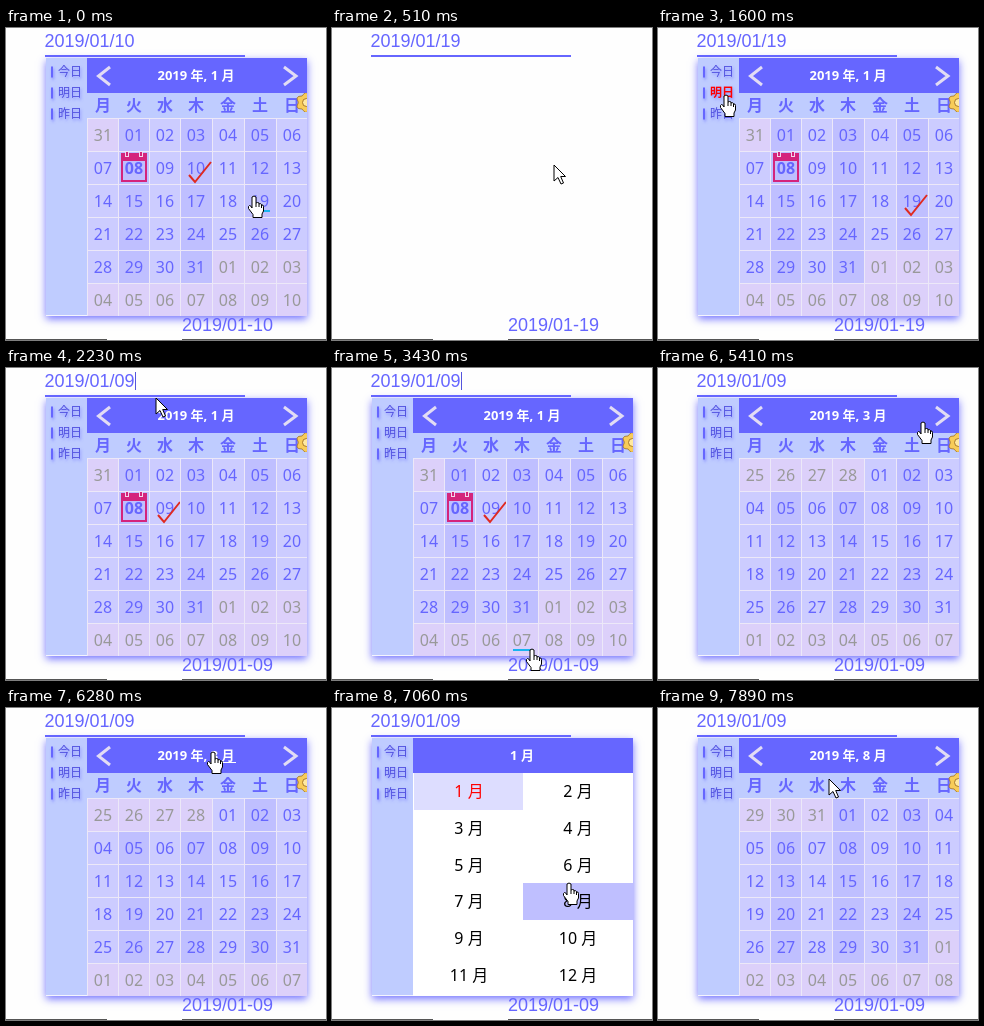
These frames come from a looping animation (320x312 px, 8 s). An HTML page with a canvas:

```html
<!DOCTYPE html>
<html lang="ja">
<head>
<meta charset="utf-8">
<title>Date picker</title>
<style>
  html, body { margin: 0; width: 100%; height: 100%; overflow: hidden; background: #fefefe; }
  canvas { display: block; }
</style>
</head>
<body>
<canvas id="stage" width="320" height="312"></canvas>
<script>
const g = document.getElementById('stage').getContext('2d');
const LOOP = 8000;
const BLUE = '#6666ff';
const SANS = '"Noto Sans", "Noto Sans CJK JP", sans-serif';
const ARIAL = '"Liberation Sans", Arial, sans-serif';

// Screen updates: first time, last time, count
const BURSTS = [
  [0, 0, 1], [120, 1080, 8], [1330, 2350, 9], [2470, 3430, 8], [3580, 4600, 9],
  [4720, 5710, 8], [5860, 6790, 8], [6940, 7060, 2], [7330, 7330, 1], [7610, 7890, 3]
];
const TICKS = BURSTS.flatMap(([a, b, n]) =>
  Array.from({ length: n }, (_, i) => a + (n > 1 ? (b - a) * i / (n - 1) : 0)));

// Pointer path: time, x, y
const PATH = [
  [0, 248, 168], [230, 248, 168], [800, 120, 14], [1000, 120, 14],
  [1570, 68, 67], [1720, 68, 67], [2090, 128, 16], [2210, 150, 30],
  [2340, 150, 30], [2720, 116, 134], [3000, 155, 140], [3200, 218, 206],
  [3430, 200, 281], [3650, 200, 281], [4440, 265, 54], [5420, 265, 54],
  [6240, 207, 44], [6390, 207, 44], [6790, 200, 184], [6940, 222, 180],
  [7050, 237, 175], [7470, 237, 175], [7890, 171, 71], [8000, 171, 71]
];
const FOCUS = [[930, 1720], [2090, 4780]];

const HAND = new Path2D('M-2 1Q0-1 2 1V7Q3.5 6 5 7V8Q6.5 7 7.5 8.5V9Q9.5 8.5 9.5 10.5V15L8 18V21.5H-1V18.5L-5.5 12.5Q-6 10-4.5 9.5Q-3 9.5-2 12Z');
const KNUCKLES = new Path2D('M2 7V11M5 8V11M7.5 9V12');
const ARROW = new Path2D('M0 0V16L4 12.5L7 19L9.5 18L6.7 11.5H11.5Z');
const BEAM = new Path2D('M-3-8H-1L0-7L1-8H3M0-7V7M-3 8H-1L0 7L1 8H3');

// The last four columns are one pixel wider
const colX = c => 81 + c * 31 + Math.max(0, c - 3);
const rowY = r => 90 + r * 33;
const monthY = r => 65 + r * 36.75;
const inside = (p, x, y, w, h) => p.x >= x && p.x < x + w && p.y >= y && p.y < y + h;
const pad = n => String(n).padStart(2, '0');

function rect(x, y, w, h, color) {
  g.fillStyle = color;
  g.fillRect(x, y, w, h);
}

function text(s, x, y, font, color, align = 'center') {
  g.font = font;
  g.fillStyle = color;
  g.textAlign = align;
  g.fillText(s, x, y);
}

function line(points, color, width) {
  g.beginPath();
  points.forEach(([x, y]) => g.lineTo(x, y));
  g.strokeStyle = color;
  g.lineWidth = width;
  g.stroke();
}

function pointerAt(t) {
  const i = Math.max(1, PATH.findIndex(k => k[0] > t));
  const [a, b] = [PATH[i - 1], PATH[i]];
  const u = (t - a[0]) / (b[0] - a[0]);
  const e = u * u * (3 - 2 * u);
  return { x: Math.round(a[1] + (b[1] - a[1]) * e), y: Math.round(a[2] + (b[2] - a[2]) * e) };
}

function stateAt(t) {
  const focus = FOCUS.find(([a, b]) => t >= a && t < b);
  return {
    p: pointerAt(t),
    day: t < 230 ? 10 : t < 1720 ? 19 : 9,
    open: t < 230 || (t >= 930 && t < 1720) || t >= 2090,
    month: t < 4700 ? 0 : t < 5200 ? 1 : t < 6390 ? 2 : 7,
    list: t >= 6390 && t < 7330,
    caret: focus && (t - focus[0]) % 1060 < 530
  };
}

function drawPage(s) {
  rect(0, 0, 320, 312, '#fefefe');
  text('2019/01/' + pad(s.day), 38.5, 19, '18px ' + ARIAL, BLUE, 'left');
  rect(39, 27, 200, 2, BLUE);
  if (s.caret) rect(129, 4, 1, 18, '#5555dd');
  text('2019/01-' + pad(s.day), 176, 303, '18px ' + ARIAL, BLUE, 'left');
  rect(0, 311, 101, 1, '#555');
  rect(176, 311, 144, 1, '#555');
}

// Returns true when the pointer is over a link
function drawSide(p) {
  let hit = false;
  rect(40, 30, 41, 257, '#bfccff');
  ['今日', '明日', '昨日'].forEach((label, i) => {
    const y = 43.5 + i * 21;
    const over = inside(p, 44, y - 8, 34, 16);
    hit = hit || over;
    g.save();
    g.shadowColor = 'rgba(102,102,255,.6)';
    g.shadowOffsetX = 1;
    g.shadowOffsetY = 2;
    g.shadowBlur = 3;
    rect(45, y - 5, 2, 11, BLUE);
    text(label, 52, y + 4.5, (over ? 'bold ' : '500 ') + '12px ' + SANS, over ? '#f00' : '#5050e0', 'left');
    g.restore();
  });
  return hit;
}

function drawHoliday() {
  g.save();
  g.beginPath();
  g.rect(288, 65, 13, 19);
  g.clip();
  g.fillStyle = '#f8cc58';
  g.strokeStyle = '#a87828';
  g.lineWidth = 1;
  g.beginPath();
  for (let i = 0; i <= 60; i++) {
    const a = i * Math.PI / 30, r = 8.8 - 1.1 * Math.cos(6 * a);
    g.lineTo(300 + r * Math.cos(a), 74.5 + r * Math.sin(a));
  }
  g.fill();
  g.stroke();
  g.beginPath();
  g.arc(300.5, 74.5, 4, 0, 7);
  g.fillStyle = '#ffe9a0';
  g.fill();
  g.stroke();
  g.restore();
}

function drawToday(x, y) {
  const pink = '#d4247c';
  g.strokeStyle = pink;
  g.lineWidth = 2;
  g.strokeRect(x + 3, y + 3, 24, 27);
  rect(x + 2, y + 2, 26, 8, pink);
  [6, 20].forEach(dx => {
    rect(x + dx, y + 1, 4, 5, '#f4d4ec');
    rect(x + dx + 1, y + 1, 2, 4, pink);
  });
}

function drawCalendar(s) {
  const { p, month } = s;
  let hit = inside(p, 264, 30, 37, 35) || inside(p, 82, 30, 30, 35);
  const onTitle = inside(p, 205, 40, 27, 16);
  text(`2019 年, ${month + 1} 月`, 190, 52, 'bold 13px ' + SANS, '#fff');
  if (onTitle) rect(204, 54, 26, 1, '#fff');
  line([[104, 39], [92.5, 48], [104, 57]], '#e2dcf4', 3);
  line([[278, 39], [290, 48], [278, 57]], '#e2dcf4', 3);

  rect(81, 65, 220, 25, '#bfccff');
  [...'月火水木金土日'].forEach((d, c) =>
    text(d, colX(c) + 16, 83, 'bold 16px ' + SANS, BLUE));
  drawHoliday();

  const lead = (new Date(Date.UTC(2019, month, 1)).getUTCDay() + 6) % 7;
  for (let i = 0; i < 42; i++) {
    const c = i % 7, x = colX(c), y = rowY(Math.floor(i / 7));
    const w = Math.min(301, colX(c + 1)) - x;
    const date = new Date(Date.UTC(2019, month, 1 - lead + i));
    const own = date.getUTCMonth() === month, day = date.getUTCDate();
    const today = own && month === 0 && day === 8;
    rect(x, y, w, 33, '#ece8f8');
    rect(x + 1, y + 1, w - 1, 32, !own ? '#dcd0fa' : c % 2 ? '#bfbfff' : '#ccccff');
    if (today) drawToday(x + 1, y);
    text(pad(day), x + 16, y + 23, (today ? 'bold ' : '') + '16px ' + SANS, own ? BLUE : '#999');
    if (inside(p, x + 5, y + 6, 22, 22)) {
      hit = true;
      rect(x + 7, y + 26, 19, 2, '#18b4f0');
    }
    if (own && month === 0 && day === s.day)
      line([[x + 9, y + 24], [x + 15, y + 31], [x + 31, y + 11]], '#e02a20', 2);
  }
  return hit || onTitle;
}

function drawMonths(p) {
  let hit = false;
  text('1 月', 190, 52, 'bold 13px ' + SANS, '#fff');
  rect(81, 65, 220, 223, '#fff');
  for (let i = 0; i < 12; i++) {
    const r = Math.floor(i / 2), x = i % 2 ? 191 : 82, y = Math.round(monthY(r));
    const w = i % 2 ? 110 : 109, h = Math.round(monthY(r + 1)) - y;
    const over = inside(p, x, y, w, h);
    hit = hit || over;
    if (over || i === 0) rect(x, y, w, h, over ? '#bfbfff' : '#ddddff');
    text(`${i + 1} 月`, x + 55, y + 24, '16px ' + SANS, i === 0 ? '#f00' : '#000');
  }
  return hit;
}

function drawPanel(s) {
  g.save();
  g.shadowColor = 'rgba(102,102,255,.9)';
  g.shadowBlur = 8;
  g.shadowOffsetY = 3;
  rect(40, 30, 261, 258, '#f4f4ff');
  g.restore();
  const side = drawSide(s.p);
  rect(81, 30, 220, 35, BLUE);
  const main = s.list ? drawMonths(s.p) : drawCalendar(s);
  return side || main;
}

function drawPointer(p, link) {
  g.save();
  g.translate(p.x, p.y);
  g.lineWidth = 1;
  g.strokeStyle = '#000';
  g.fillStyle = '#fff';
  if (inside(p, 39, 2, 200, 26)) {
    g.stroke(BEAM);
  } else {
    const shape = link ? HAND : ARROW;
    g.fill(shape);
    g.stroke(shape);
    if (link) g.stroke(KNUCKLES);
  }
  g.restore();
}

function render(tick) {
  const s = stateAt(tick);
  drawPage(s);
  drawPointer(s.p, s.open && drawPanel(s));
}

let shown = -1;
const start = performance.now();
function loop() {
  const t = (performance.now() - start) % LOOP;
  const tick = TICKS.filter(k => k <= t).pop();
  if (tick !== shown) render(shown = tick);
  requestAnimationFrame(loop);
}
loop();
</script>
</body>
</html>
```
